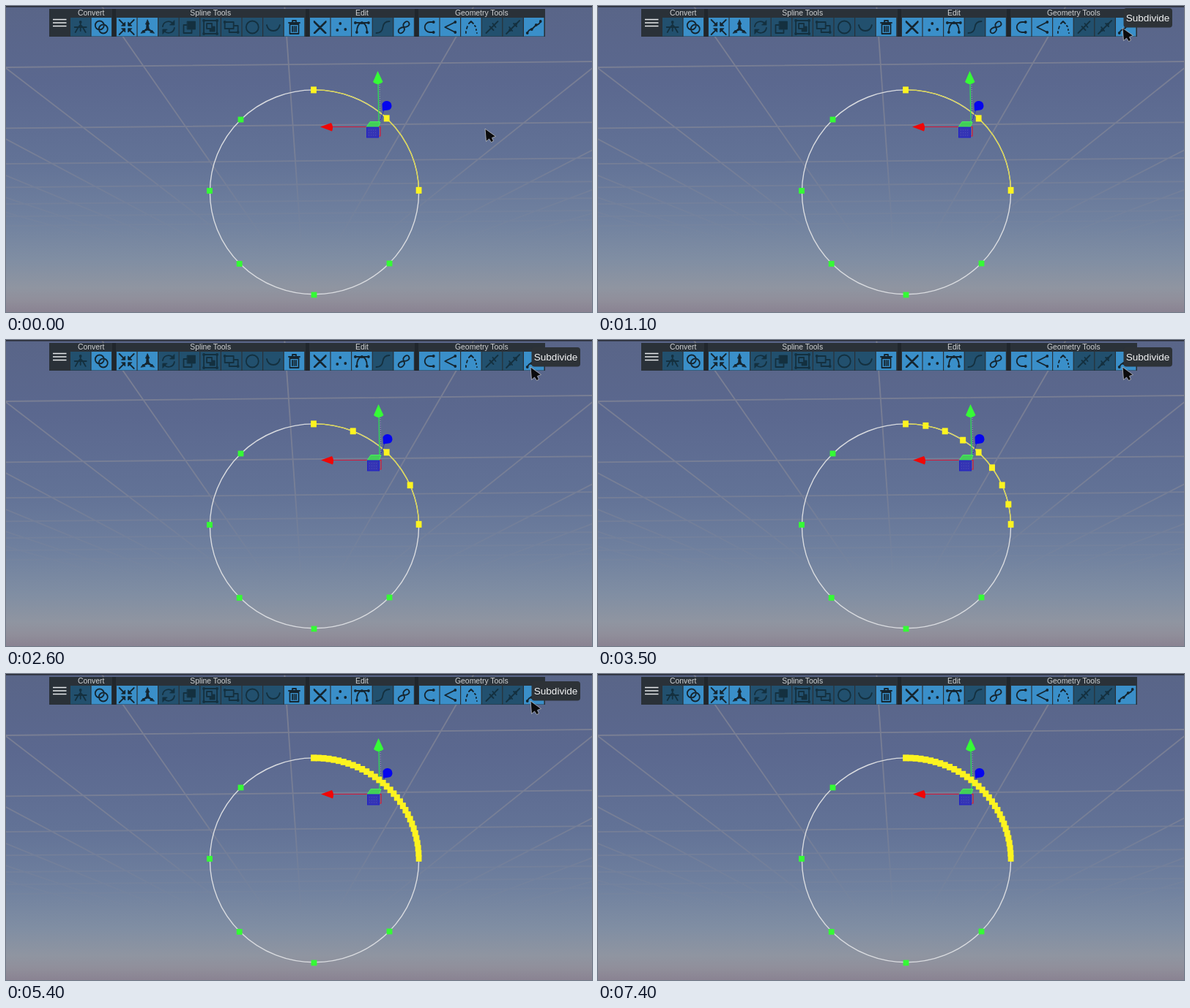
Write an HTML page that moves like this. It is 800 px wide and 419 px high and loops after 7.5 s.

```html
<!DOCTYPE html>
<html lang="en">
<head>
<meta charset="utf-8">
<title>Spline subdivide</title>
<style>
html, body { margin: 0; width: 100%; height: 100%; overflow: hidden; background: #5b688c; }
svg { display: block; width: 800px; height: 419px; }
text { font-family: "Liberation Sans", Arial, sans-serif; }
.label { font-size: 10.4px; fill: #d0d2d4; text-anchor: middle; }
.icon { fill: none; stroke: #15252f; stroke-width: 1.8; stroke-linecap: round; stroke-linejoin: round; }
.icon .fill { fill: #15252f; stroke-width: .8; }
.icon .dots { stroke-width: 3.8; }
.off { stroke: #14303f; }
.off .fill { fill: #14303f; }
.yellow { fill: #fdf420; }
.green { fill: #35fb35; }

.l1, .l2, .l3, .l4, #gizmo, #tip { animation: 7.5s step-end infinite; }
.l1 { animation-name: l1; }
.l2 { animation-name: l2; }
.l3 { animation-name: l3; }
.l4 { animation-name: l4; }
#gizmo { animation-name: nudge; }
#tip { animation-name: tip; }
#pointer { animation: move 7.5s infinite; }

@keyframes l1 { 0% { visibility: hidden } 33.33%, 100% { visibility: visible } }
@keyframes l2 { 0% { visibility: hidden } 43.99%, 100% { visibility: visible } }
@keyframes l3 { 0% { visibility: hidden } 54.66%, 100% { visibility: visible } }
@keyframes l4 { 0% { visibility: hidden } 65.33%, 100% { visibility: visible } }
@keyframes nudge { 0% { transform: none } 33.33%, 100% { transform: translate(1px, -1px) } }
@keyframes tip { 0% { visibility: hidden } 9.33% { visibility: visible } 78.66%, 100% { visibility: hidden } }
@keyframes move {
  0% { transform: translate(654px, 168px); animation-timing-function: steps(7) }
  9.33% { transform: translate(730px, 36px); animation-timing-function: steps(3) }
  13.33% { transform: translate(716px, 30px); animation-timing-function: step-end }
  15.99% { transform: translate(716px, 30px); animation-timing-function: steps(7) }
  25.33% { transform: translate(716px, 37px); animation-timing-function: step-end }
  77.33% { transform: translate(717px, 27px); animation-timing-function: step-end }
  78.66% { transform: translate(718px, 6px); animation-timing-function: step-end }
  79.99%, 100% { transform: translate(718px, -60px) }
}
</style>
</head>
<body>
<svg viewBox="0 0 800 419">
  <defs>
    <linearGradient id="sky" x2="0" y2="1">
      <stop offset="0" stop-color="#596588"/>
      <stop offset=".25" stop-color="#5b688f"/>
      <stop offset=".5" stop-color="#627296"/>
      <stop offset=".7" stop-color="#70819f"/>
      <stop offset=".83" stop-color="#808ea3"/>
      <stop offset=".92" stop-color="#8f95a1"/>
      <stop offset=".96" stop-color="#908f9b"/>
      <stop offset="1" stop-color="#8a8392"/>
    </linearGradient>
    <linearGradient id="haze" gradientUnits="userSpaceOnUse" x1="0" y1="0" x2="0" y2="330">
      <stop offset="0" stop-color="#8a8b97" stop-opacity=".7"/>
      <stop offset=".6" stop-color="#8a8b97" stop-opacity=".55"/>
      <stop offset=".8" stop-color="#8a8b97" stop-opacity=".25"/>
      <stop offset="1" stop-color="#8a8b97" stop-opacity="0"/>
    </linearGradient>
  </defs>
  <rect width="800" height="419" fill="url(#sky)"/>
  <path id="grid" fill="none" stroke="url(#haze)" stroke-width="1.8"/>
  <rect width="800" height="1.6" fill="#2a2e38"/>

  <ellipse cx="421" cy="254.800" rx="142.600" ry="139.900" fill="none" stroke="#dadce0" stroke-width="1.400"/>
  <path id="arc" fill="none" stroke="#dfd844" stroke-width="1.300"/>

  <g id="gizmo">
    <path d="M516 142L510 160" stroke="#2b35b5"/>
    <path d="M508 106L509 159" stroke="#2fdc55" stroke-width="1.300"/>
    <path d="M510 108L511 157" stroke="#8fa8a8" stroke-dasharray="1 2"/>
    <path d="M444 165.500H511V178H508" fill="none" stroke="#d81838" stroke-width="1.200"/>
    <path d="M492 166L497 158.500H511L508.500 165.500Z" fill="#42cf58" stroke="#46f35a"/>
    <rect x="492.500" y="166" width="16" height="14" fill="#3434b4" stroke="#2020c8"/>
    <path d="M495 170h12M495 173.500h12M495 177h12" stroke="#5050bc" stroke-dasharray="1 2"/>
    <path d="M507.500 89L501 104Q507.500 110.500 514.500 104Z" fill="#36fc36"/>
    <path d="M429 165.500L444 160Q447.500 165.500 445 171.500Z" fill="#f00606"/>
    <path d="M513.500 134Q516 129.500 520.500 130Q526.500 131 526.500 137Q526 142 521.500 142.500L514 143.500Z" fill="#0505ee"/>
  </g>
  <g id="points"></g>
  <g id="bar">
    <rect x="59" y="4" width="677" height="38" fill="#2a3138"/>
    <path d="M64 18.500H82.500M64 23H82.500M64 27.500H82.500" stroke="#e8eaec" stroke-width="1.700"/>
  </g>

  <g id="pointer">
    <g id="tip">
      <rect x="1.500" y="-27" width="66.500" height="26.500" rx="4" fill="#2d3237"/>
      <text x="34.500" y="-9.200" text-anchor="middle" font-size="13.600" fill="#f3f4f5">Subdivide</text>
    </g>
    <path d="M0 0L1.500 17.500L5.500 14L8.500 18.500L11.500 17L9.500 12.500L14.500 10.500Z" fill="#0b0b0d" stroke="#b9bdc6" stroke-width=".8" stroke-linejoin="round"/>
  </g>
</svg>
<script>
const $ = id => document.getElementById(id);
const add = (id, markup) => $(id).insertAdjacentHTML('beforeend', markup);

// Ground grid in perspective
const VX = 408, VY = 400;
let grid = '';
for (let i = -6; i <= 6; i++) {
  const dx = i * 229 + i * i * 4 - 25;
  grid += `M${VX + dx * 1.11} 0L${VX + dx * 0.16} 342`;
}
for (let i = 0; i < 7; i++) {
  const y = VY - 1 / (0.003125 + i * 0.0011);
  grid += `M0 ${y + 4}L800 ${y - 4}`;
}
$('grid').setAttribute('d', grid);

// Spline points on the ring
const RX = 142.6, RY = 139.9;
const rad = Math.PI / 180;
const onRing = deg => [421 + RX * Math.cos(deg * rad), 254.8 + RY * Math.sin(deg * rad)];
const box = ([x, y], w, h, cls) =>
  `<rect class="${cls}" x="${x - w / 2}" y="${y - h / 2}" width="${w}" height="${h}"/>`;
const anchors = [-90.4, -46.2, -1];
const [from, to] = [onRing(anchors[0]), onRing(anchors[2])];
$('arc').setAttribute('d', `M${from}A${RX} ${RY} 0 0 1 ${to}`);

[[320.5, 155.5], [278, 253], [318.7, 353], [420.5, 395.5], [523.5, 352.5]]
  .forEach(p => add('points', box(p, 7.8, 7.8, 'green')));
anchors.forEach(a => add('points', box(onRing(a), 7.8, 9, 'yellow')));
for (let level = 1; level <= 4; level++) {
  const n = 2 ** level;
  for (let s = 0; s < 2; s++)
    for (let i = 1; i < n; i += 2) {
      const a = anchors[s] + (anchors[s + 1] - anchors[s]) * i / n;
      add('points', box(onRing(a), 8, 8.8, `yellow l${level}`));
    }
}

// Toolbar icons: [stroke, fill, dots]
const icons = {
  tree: ['M0-7V-3M-7 7L-3 0L0-3L3 0L7 7M-8 0H8M0-3V5', '', 'M0-7h0'],
  rings: ['M3.5-2.5a6 6 0 1 1-12 0a6 6 0 1 1 12 0M8.5 2.5a6 6 0 1 1-12 0a6 6 0 1 1 12 0'],
  gather: ['M-10-10L-3-3M10-10L3-3M-10 10L-3 3M10 10L3 3', 'M-2-2V-7L-7-2ZM2-2V-7L7-2ZM-2 2V7L-7 2ZM2 2V7L7 2Z'],
  axes: ['M0-6V2L-6 6M0 2L6 6', 'M0-10L2.5-4H-2.5ZM-9 8L-6 4L-3.5 7ZM9 8L6 4L3.5 7ZM-1-4H1L2 2L6 6L0 4L-6 6L-2 2Z'],
  cycle: ['M-8-1A8 8 0 0 1 6-5M8 1A8 8 0 0 1-6 5', 'M8-9V-3H2ZM-8 9V3H-2Z'],
  stack: ['M-4-3H-8V8H3V4', 'M-3-8H8V3H-3Z'],
  group: ['M-9-9H9V9H-9ZM-5-5H2V2H-5Z', 'M3-1H6V6H-1V3H3Z', 'M-9-9h0M9-9h0M-9 9h0M9 9h0'],
  split: ['M-9-7H3V2H-9ZM4-2H9V7H-3V3', '', 'M-9-7h0M9 7h0'],
  circle: ['M8.5 0a8.5 8.5 0 1 1-17 0a8.5 8.5 0 1 1 17 0'],
  curve: ['M-9-3Q-7 5 0 5Q7 5 9-3'],
  bin: ['M-7.5-6H7.5M-2.5-6V-9H2.5V-6M-6-4V9H6V-4ZM-2.5-1V6M0-1V6M2.5-1V6'],
  cross: ['M-8-8L8 8M8-8L-8 8M-8-7L7 8M8-7L-7 8'],
  dots: ['', '', 'M-1-5h0M-5 4h0M6 3h0'],
  handles: ['M-8-6H8M-7 7Q-7-5 0-6Q7-5 7 7', '', 'M-9-6h0M9-6h0M0-6h0M-7 7h0M7 7h0'],
  wave: ['M-9 8Q-1 8 0 0Q1-8 9-8'],
  eight: ['M0 0C-3-5 5-11 7-6C9-2 4 0 0 0C-4 0-9 3-7 7C-4 11 3 5 0 0'],
  open: ['M6-7H1A7 7 0 0 0 1 7H6', '', 'M6-7h0M6 7h0'],
  corner: ['M7-7L-7 0L7 7', '', 'M7-7h0M7 7h0'],
  dashed: ['M-7 8V6M-6 2L-5-1M-3-5L0-8L3-5M5-2L6-1M7 3V4M8 8h0'],
  cut: ['M-8 8L8-8M-3-1L2 4M1-5L5 0'],
  cuts: ['M-9 9L9-9M-5 0L-1 5M1-5L5-1', '', 'M-4 4h0M4-4h0'],
  divide: ['M-9 8Q-7 3-3 3L3-3Q8-4 9-8', '', 'M-9 8h0M-3 3h0M3-3h0M9-8h0']
};

// A leading "-" marks a disabled button
const sections = [
  ['Convert', 88, '-tree rings'],
  ['Spline Tools', 151, 'gather axes -cycle -stack -group -split -circle -curve bin'],
  ['Edit', 415, 'cross dots handles -wave eight'],
  ['Geometry Tools', 564, 'open corner dashed -cut -cuts divide']
];
const PITCH = 28.6;

sections.forEach(([name, x, list], s) => {
  const names = list.split(' ');
  if (s) add('bar', `<rect x="${x - 6}" y="4" width="5" height="38" fill="#20262c"/>`);
  add('bar', `<text class="label" x="${x + names.length * PITCH / 2 - 0.5}" y="13.3">${name}</text>`);
  names.forEach((id, i) => {
    const off = id[0] === '-';
    const [line, fill = '', dots = ''] = icons[id.replace('-', '')];
    const bx = x + i * PITCH;
    add('bar', `<rect x="${bx}" y="16" width="27.4" height="25.5" fill="${off ? '#22506e' : '#3a8fc9'}"/>
      <g class="icon ${off ? 'off' : ''}" transform="translate(${bx + 13.7} 29)">
      <path d="${line}"/><path class="fill" d="${fill}"/><path class="dots" d="${dots}"/></g>`);
  });
});
</script>
</body>
</html>
```
